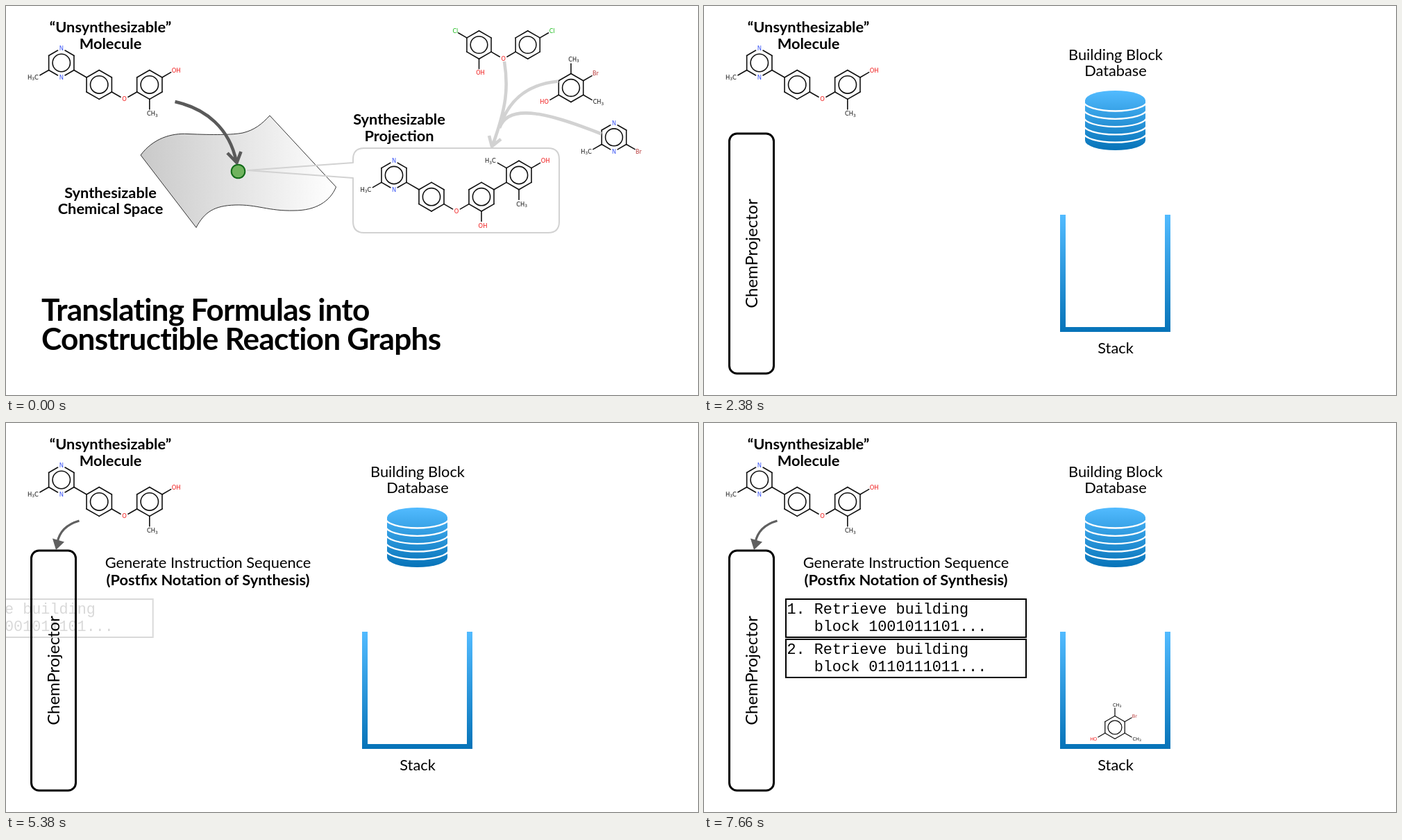
An HTML page for the animation above (8000 ms loop, 997x561 px).

```html
<!DOCTYPE html>
<html lang="en">
<head>
<meta charset="utf-8">
<style>
html, body { margin: 0; width: 100%; height: 100%; overflow: hidden; background: #fff; }
svg { display: block; width: 100vw; height: 100vh; }
text { font-family: Lato, sans-serif; font-size: 21.8px; text-anchor: middle; }
.b { font-weight: 700; }
.title { font-weight: 700; font-size: 44.2px; letter-spacing: -.8px; text-anchor: start; }
.code { font-family: "Liberation Mono", monospace; font-size: 21.8px; text-anchor: start; }
.mol text { font-family: "DejaVu Sans", sans-serif; font-size: 8.3px; }
.mol path, .mol circle { fill: none; stroke: #111; stroke-width: 1.6; stroke-linecap: round; }
</style>
</head>
<body>
<svg id="stage" viewBox="0 0 997 561"></svg>
<script>
const R = 20.8;
const RED = '#f01818', BLUE = '#3a55f5', GREEN = '#10b810', BROWN = '#b83a3a', BLACK = '#111';

// Point at distance d from (x, y); k counts sixths of a turn from the top.
const at = (x, y, k, d = R) => [x + d * Math.sin(k * Math.PI / 3), y - d * Math.cos(k * Math.PI / 3)];

function line([x1, y1], [x2, y2], trim1 = 0, trim2 = 0) {
  const len = Math.hypot(x2 - x1, y2 - y1), ux = (x2 - x1) / len, uy = (y2 - y1) / len;
  const n = v => v.toFixed(2);
  return `<path d="M${n(x1 + ux * trim1)} ${n(y1 + uy * trim1)}L${n(x2 - ux * trim2)} ${n(y2 - uy * trim2)}"/>`;
}

function atom([x, y], name, color) {
  const rich = name.replace(/3(.*)/, '<tspan style="font-size:5.800px" dy="1.4">3</tspan><tspan dy="-1.4">$1</tspan>');
  return `<text x="${x}" y="${y + 3}" fill="${color}">${rich}</text>`;
}

function ring(x, y, nitrogens = []) {
  let out = `<circle cx="${x}" cy="${y}" r="12.600"/>`;
  const gap = k => nitrogens.includes(k % 6) ? 6 : 0;
  for (let k = 0; k < 6; k++) out += line(at(x, y, k), at(x, y, k + 1), gap(k), gap(k + 1));
  for (const k of nitrogens) out += atom(at(x, y, k), 'N', BLUE);
  return out;
}

// Bond leaving a ring at corner k, ending in a labelled group.
function arm(x, y, k, name, color = BLACK, dx = 0) {
  const end = at(x, y, k, 2 * R);
  return line(at(x, y, k), end, 0, 6.3) + atom([end[0] + dx, end[1]], name, color);
}

const mol = (x, y, scale, parts) =>
  `<g class="mol" transform="translate(${x} ${y}) scale(${scale})">${parts}</g>`;

const pyrazine = ring(0, 0, [0, 3]) + arm(0, 0, 4, 'H3C', BLACK, -4.5);
const chain = pyrazine + line(at(0, 0, 2), at(0, 0, 2, 2 * R)) +
  ring(54, 31.2) + arm(54, 31.2, 2, 'O', RED) +
  ring(126, 31.2) + arm(126, 31.2, 4, ' ');
const bromo = ring(0, 0) + arm(0, 0, 0, 'CH3', BLACK, 4) + arm(0, 0, 1, 'Br', BROWN) +
  arm(0, 0, 2, 'CH3', BLACK, 4) + arm(0, 0, 4, 'HO', RED, -3);
const ether = ring(0, 0) + arm(0, 0, 5, 'Cl', GREEN, 1) + arm(0, 0, 3, 'OH', RED, 2) + arm(0, 0, 2, 'O', RED) +
  ring(72, 0) + arm(72, 0, 4, ' ') + arm(72, 0, 1, 'Cl', GREEN);
const product = chain + arm(126, 31.2, 3, 'OH', RED, 2) + line(at(126, 31.2, 1), at(126, 31.2, 1, 2 * R)) +
  ring(180, 0) + arm(180, 0, 1, 'OH', RED, 2) + arm(180, 0, 5, 'H3C', BLACK, -5) + arm(180, 0, 3, 'CH3', BLACK, 4);

const text = (x, y, str, cls = '') => `<text class="${cls}" x="${x}" y="${y}">${str}</text>`;
const stroke = (d, color, width, fill = 'none') =>
  `<path d="${d}" fill="${fill}" stroke="${color}" stroke-width="${width}" stroke-linejoin="round"/>`;
const gradient = (id, from, to, dir) =>
  `<linearGradient id="${id}" ${dir}><stop stop-color="${from}"/><stop offset="1" stop-color="${to}"/></linearGradient>`;

const intro =
  stroke('M194 215C212 191 238 183 262 184.5C300 186 325 186 341 183C358 179 369 170 380 158L475.5 261C467 282 446 295 415 295C378 296 362 286 330 287C300 288 286 297 274 319.5Z', '#333', 1, 'url(#sheet)') +
  stroke('M348 237L500 226V221Q500 205 516 205H781Q797 205 797 221V311Q797 327 781 327H516Q500 327 500 311V248Z', '#d2d2d2', 2) +
  '<circle cx="334.500" cy="238.500" r="9.800" fill="#70b35e" stroke="#126b18" stroke-width="2"/>' +
  stroke('M243.500 138C288 148 322 176 332 225M319 212L332.500 226L338.500 210', '#5a5a5a', 4.6) +
  mol(681.5, 56, .975, ether) + mol(814, 118, .985, bromo) +
  mol(876, 189.3, .985, pyrazine + arm(0, 0, 2, 'Br', BROWN)) + mol(559, 244, 1, product) +
  stroke('M718 80C724 118 721 146 701 201M796 108.500C748 113 723 138 711 176M858 184.500C800 162 725 134 711 176M696 187L700 202.500L713 192', '#d2d2d2', 4.6) +
  text(566.5, 171, 'Synthesizable', 'b') + text(566.5, 194.5, 'Projection', 'b') +
  text(150.5, 276.5, 'Synthesizable', 'b') + text(150.5, 300, 'Chemical Space', 'b') +
  text(51, 454, 'Translating Formulas into', 'title') +
  text(51, 496, 'Constructible Reaction Graphs', 'title');

const diskGaps = [0, 1, 2, 3, 4].map(i => stroke(`M547 ${137.5 + 11.3 * i}A45.5 14 0 0 0 638 ${137.5 + 11.3 * i}`, '#fff', 2.3)).join('');
const setup =
  '<rect x="36.500" y="184" width="64" height="346" rx="11" fill="none" stroke="#000" stroke-width="3"/>' +
  '<text transform="translate(76.500 357) rotate(-90)" style="font-size:23.900px">ChemProjector</text>' +
  text(593, 77.5, 'Building Block') + text(593, 101, 'Database') + text(593, 501, 'Stack') +
  '<path fill="url(#blue)" d="M549 136A43.500 14 0 0 1 636 136V194A43.500 14 0 0 1 549 194Z"/>' + diskGaps +
  '<path fill="url(#blue)" d="M513 301h8v162h143v-162h8v169h-159z"/>';

const step = (y, n, bits) =>
  `<rect x="118" y="${y}" width="346" height="55" fill="none" stroke="#000" stroke-width="2"/>` +
  text(119.5, y + 21, n + '. Retrieve building', 'code') + text(158.7, y + 45.5, `block ${bits}...`, 'code');

const layers = {
  intro, setup,
  arrow: stroke('M105.500 141C88 146 77 157 74 172', '#606060', 3.2) + '<path fill="#606060" d="M67 166.500L84 171.500L72 183Z"/>',
  heading: text(291, 208.5, 'Generate Instruction Sequence') + text(291, 234, '(Postfix Notation of Synthesis)', 'b'),
  first: step(254, 1, '1001011101'),
  second: step(312, 2, '0110111011'),
  block: mol(592, 439, .79, bromo)
};

const stage = document.getElementById('stage');
stage.innerHTML = '<defs>' + gradient('sheet', '#c9c9c9', '#fff', '') +
  gradient('blue', '#52bbff', '#0673b8', 'x2="0" y2="1"') + '</defs>' +
  Object.entries(layers).map(([id, body]) => `<g id="${id}">${body}</g>`).join('') +
  text(150.5, 37.5, '“Unsynthesizable”', 'b') + text(150.5, 61.5, 'Molecule', 'b') +
  mol(79.8, 82, 1.008, chain + arm(126, 31.2, 1, 'OH', RED, 2) + arm(126, 31.2, 3, 'CH3', BLACK, 4));

const layer = Object.fromEntries(Object.keys(layers).map(id => [id, document.getElementById(id)]));
const progress = (t, start, length) => Math.min(1, Math.max(0, (t - start) / length));

function show(id, opacity, x = 0, y = 0) {
  layer[id].setAttribute('opacity', opacity);
  layer[id].setAttribute('transform', `translate(${x} ${y})`);
}

// Fades in while gliding to rest from an offset.
function glide(id, p, dx, dy) {
  const left = (1 - p) ** 3;
  show(id, Math.min(1, p * 1.45), dx * left, dy * left);
}

function draw() {
  const t = performance.now() % 8000;
  show('intro', (1 + Math.cos(Math.PI * progress(t, 460, 1400))) / 2);
  show('setup', t >= 2380 ? 1 : 0);
  show('arrow', progress(t, 2820, 440));
  glide('heading', progress(t, 3980, 800), -349, 0);
  glide('first', progress(t, 5340, 400), -349, 0);
  glide('block', progress(t, 6260, 440), 0, -373);
  glide('second', progress(t, 7260, 400), -349, 0);
  requestAnimationFrame(draw);
}
draw();
</script>
</body>
</html>
```
